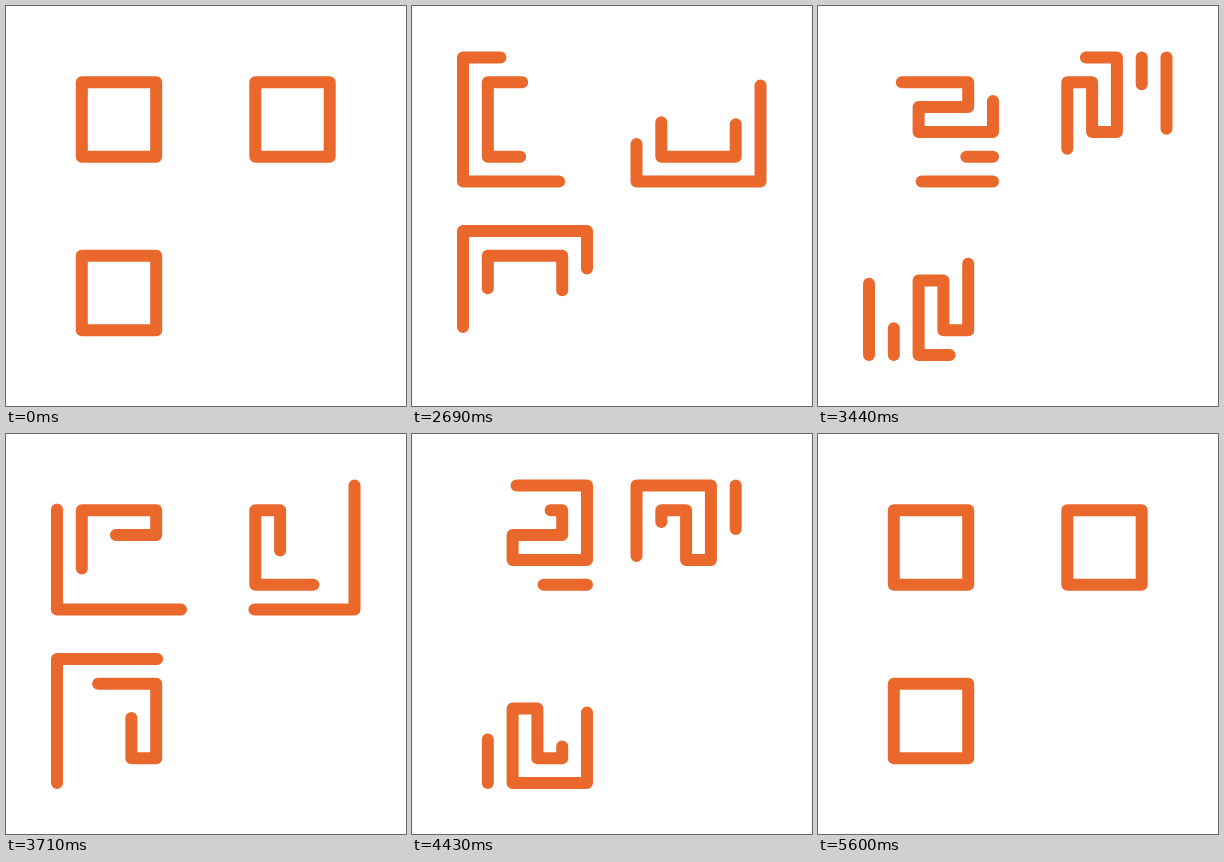
Recreate the animation shown at these times as an HTML page. Size 400 px wide and 400 px high, loop 7.43 s.

```html
<!DOCTYPE html>
<html lang="en">
<head>
<meta charset="utf-8">
<title>Three squares</title>
<style>
  html, body { margin: 0; width: 100%; height: 100%; overflow: hidden; background: #fff; }
  svg { display: block; width: 100%; height: 100%; }
  #maze { fill: none; stroke: #ea682c; stroke-width: .484; stroke-linecap: round; stroke-linejoin: round; }
</style>
</head>
<body>
<svg viewBox="0 0 400 400">
  <defs>
    <!-- one quadrant on a grid of 5 by 5 units -->
    <g id="maze" transform="scale(24.8) translate(-2.5 -2.5)">
      <path id="leave" d="M1 2.5V4H4V1H1V4H5"/>
      <path id="cross" d="M5 5H0V0H5V3H2V2H4V1H1V4H5"/>
      <path id="arrive" d="M5 5H0V0H5V3H2V2H4V1H1V4H4V1H1V2.5"/>
    </g>
  </defs>
  <use href="#maze" transform="translate(113 113.5)"/>
  <use href="#maze" transform="translate(286.5 113.5) rotate(-90)"/>
  <use href="#maze" transform="translate(113 287) rotate(90)"/>
</svg>
<script>
const LOOP = 7430, START = 2000, STEP = 30, STEPS = 120;

// Lengths in grid units: maze up to the square's corner, from there to the
// exit, and around the square between that corner and the middle of its side.
const MAZE = 28, EXIT = 7, AROUND = 10.5, HALF = 1.5, SIDES = 12;

const clamp = (x, max) => Math.min(max, Math.max(0, x));

// A line's end walks its legs at an even pace; each leg is [length, steps].
const walk = (start, from, ...legs) => n => {
  let left = n - start, at = from;
  for (const [length, steps] of legs) {
    at += length * clamp(left / steps, 1);
    left -= steps;
  }
  return at;
};

const line = (id, tail, head) => ({ path: document.getElementById(id), tail, head });

const lines = [
  line('leave',
    walk(0, 0, [AROUND, 26.5], [EXIT, 25.4]),
    walk(12.8, SIDES, [EXIT - HALF, 20])),
  line('cross',
    walk(21.2, 0, [MAZE, 44.8], [EXIT, 20]),
    walk(5.2, 0, [MAZE, 43.3], [EXIT, 25.4])),
  line('arrive',
    walk(60.2, 0, [MAZE, 47.9], [HALF, 4]),
    walk(43.8, 0, [MAZE, 40.9], [HALF + SIDES, 35.3]))
];

function draw(n) {
  for (const { path, tail, head } of lines) {
    const from = tail(n), length = head(n) - from;
    path.setAttribute('visibility', length > .001 ? 'visible' : 'hidden');
    path.setAttribute('stroke-dasharray', `${Math.max(length, .001)} 999`);
    path.setAttribute('stroke-dashoffset', -from);
  }
}

const begin = performance.now();
function tick(now) {
  const t = Math.max(0, now - begin) % LOOP;
  draw(clamp(Math.floor((t - START) / STEP), STEPS));
  requestAnimationFrame(tick);
}
draw(0);
requestAnimationFrame(tick);
</script>
</body>
</html>
```
